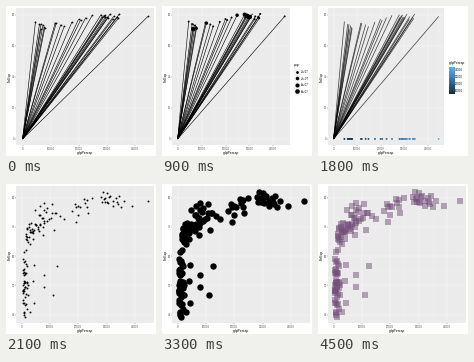
A matplotlib script for the animation above (4.8 s loop, 150 by 150 pixels).

```python
import numpy as np
import matplotlib.pyplot as plt
from matplotlib.animation import FuncAnimation
from matplotlib.colors import LinearSegmentedColormap
from matplotlib.patches import Rectangle

SIZE, DPI = 150, 100
PT = 72 / DPI
TOP, BOTTOM, LEFT = 1.7, 139.2, 10.3
FULL, WIDE, NARROW = 148.3, 128.0, 126.0
BLUE, PURPLE = "#1f6ab3", "#75507b"

plt.rcParams["font.family"] = "Liberation Sans"
ramp = LinearSegmentedColormap.from_list("ramp", ["#132B43", "#56B1F7"])

# European countries: income in thousands, life expectancy
europe = np.array([
    (4.604, 75.7), (32.418, 79.0), (30.486, 78.3), (6.019, 74.1), (7.697, 72.1),
    (11.628, 74.9), (17.596, 75.5), (32.167, 77.2), (28.205, 78.4), (28.926, 79.6),
    (30.036, 78.7), (22.514, 78.3), (14.844, 72.6), (31.163, 80.5), (34.077, 77.8),
    (27.968, 80.2), (6.557, 74.0), (33.725, 78.5), (44.684, 79.05), (12.002, 74.7),
    (19.971, 77.3), (7.885, 71.3), (7.236, 73.2), (13.639, 73.8), (20.660, 76.7),
    (24.836, 79.8), (29.342, 80.0), (34.481, 80.62), (6.508, 70.8), (29.479, 78.5)])

pop = np.full(len(europe), 6.5)
for i, millions in {9: 59.9, 10: 82.4, 13: 0.3, 15: 57.9, 16: 0.7, 17: 16.1,
                    19: 38.6, 21: 22.4, 25: 40.2, 28: 67.3, 29: 59.9}.items():
    pop[i] = millions

others = np.array([
    (30.688, 80.4), (23.190, 79.1), (28.605, 82.0), (30.209, 81.5), (36.023, 78.8),
    (35.110, 76.9), (21.906, 79.7), (23.235, 77.0), (19.234, 77.0), (23.404, 74.8),
    (19.775, 74.2), (19.015, 71.6), (10.207, 73.0), (39.097, 77.3), (33.329, 79.8),
    (18.856, 77.8), (11.461, 69.0), (10.779, 77.9), (10.742, 74.9), (7.723, 78.1),
    (6.341, 77.2), (12.522, 56.8), (11.004, 46.6), (7.703, 49.3), (7.711, 53.4),
    (4.072, 51.5), (4.128, 43.9), (2.773, 41.0), (4.391, 57.0), (1.072, 39.193),
    (0.672, 40.0), (0.241, 45.0), (0.699, 41.0), (9.535, 72.7), (9.022, 72.0)])


def make_world():
    rng = np.random.default_rng(7)
    poor = 10 ** rng.uniform(-0.4, 0.35, 41)
    poor_life = np.clip(rng.normal(50.5, 5.5, 41), 40.5, 64)
    mid = 10 ** rng.uniform(0.12, 0.98, 36)
    mid_life = 70 + 9 * (np.log10(mid) - 0.6) + rng.normal(0, 2.4, 36)
    rest = np.column_stack([np.r_[poor, mid], np.r_[poor_life, mid_life]])
    return np.vstack([europe, others, rest])


world = make_world()

fig = plt.figure(figsize=(SIZE / DPI, SIZE / DPI), dpi=DPI, facecolor="white")
ax = fig.add_axes([0, 0, 1, 1])


def reset():
    ax.clear()
    ax.set_xlim(0, SIZE)
    ax.set_ylim(SIZE, 0)
    ax.axis("off")


def box(x, y, w, h, color, z=0):
    ax.add_patch(Rectangle((x, y), w, h, fc=color, ec="none", zorder=z))


def line(x, y, width, color, z=1, alpha=1):
    ax.plot(x, y, color=color, lw=width * PT, alpha=alpha, zorder=z,
            solid_capstyle="butt")


def label(x, y, text, size=2.75, color="#4d4d4d", ha="center", **kw):
    ax.text(x, y, text, fontsize=size * PT, color=color, ha=ha,
            va="center_baseline" if not kw else "center", **kw)


def dots(x, y, r, color, marker="o", alpha=1):
    side = 2 * np.asarray(r) * PT
    ax.scatter(x, y, s=side ** 2, c=color, marker=marker, alpha=alpha,
               linewidths=0, zorder=5)


def scale(lo, hi, start, end):
    pad = (end - start) / 22
    return lambda v: start + pad + (np.asarray(v) - lo) / (hi - lo) * (end - start - 2 * pad)


def panel(right, xr, yr, yticks):
    """Draw the grey panel with its axes and return both scales."""
    sx = scale(*xr, LEFT, right)
    sy = scale(*yr, BOTTOM, TOP)
    box(LEFT, TOP, right - LEFT, BOTTOM - TOP, "#EBEBEB")
    xticks = np.arange(0, 50, 10)
    half = (yticks[1] - yticks[0]) / 2
    for v in np.arange(0, 50, 5):
        if LEFT < sx(v) < right:
            line([sx(v)] * 2, [TOP, BOTTOM], 0.33 if v % 10 == 0 else 0.17, "white")
    for v in np.arange(yticks[0], yticks[-1] + half, half):
        line([LEFT, right], [sy(v)] * 2, 0.33 if v in yticks else 0.17, "white")
    for v in xticks:
        line([sx(v)] * 2, [BOTTOM, BOTTOM + 0.86], 0.33, "#333333")
        label(sx(v), 142.1, str(v * 1000))
    for v in yticks:
        line([LEFT - 0.86, LEFT], [sy(v)] * 2, 0.33, "#333333")
        label(LEFT - 1.5, sy(v), str(v), ha="right")
    label((LEFT + right) / 2, 146.3, "gdpPercap", 3.44, "black")
    label(3.6, (TOP + BOTTOM) / 2, "lifeExp", 3.44, "black", rotation=90)
    return sx, sy


def radius(values):
    t = (values - values.min()) / np.ptp(values)
    return 0.1 + 0.37 * (1 + 5 * np.sqrt(t))


def key_radius(v, values):
    t = (v - values.min()) / np.ptp(values)
    return 0.1 + 0.37 * (1 + 5 * np.sqrt(t))


def color_bar():
    x, top, h = 130.5, 60.8, 27.0
    label(x, 56.8, "gdpPercap", 3.44, "black", ha="left")
    ax.imshow(np.linspace(1, 0, 60)[:, None], cmap=ramp, aspect="auto", zorder=2,
              extent=(x, x + 5.4, top + h, top), interpolation="bilinear")
    lo, hi = europe[:, 0].min(), europe[:, 0].max()
    for v in (10, 20, 30, 40):
        y = top + (hi - v) / (hi - lo) * h
        for a in (x, x + 4.3):
            line([a, a + 1.1], [y, y], 0.25, "white", 3)
        label(x + 6.5, y, str(v * 1000), color="black", ha="left")


def key_legend(x, title, names, draw):
    label(x, 58.5, title, 3.44, "black", ha="left")
    for i, name in enumerate(names):
        y = 65.6 + 6.6 * i
        box(x, y - 3.1, 5.6, 6.2, "#F2F2F2")
        draw(i, x + 2.8, y)
        label(x + 6.7, y, name, color="black", ha="left")


def rays(step):
    gdp, life = europe.T
    right = FULL if step == 0 else WIDE if step == 3 else NARROW
    sx, sy = panel(right, (0, gdp.max()), (0, life.max()), [0, 20, 40, 60, 80])
    alphas = np.ones(len(gdp))
    if step == 4:
        alphas = 0.4 + 0.6 * (gdp - gdp.min()) / np.ptp(gdp)
    elif step > 4:
        alphas *= 0.7
    for g, e, a in zip(gdp, life, alphas):
        line([sx(0), sx(g)], [sy(0), sy(e)], 0.6 if step < 4 else 0.75, "black", 4, a)

    x, y = sx(gdp), sy(life)
    thousands = ["10000", "20000", "30000", "40000"]
    if step == 0:
        dots(x, y, 0.9, "black")
    elif step == 2:
        dots(x, y, radius(gdp), "black")
        key_legend(130.5, "gdpPercap", thousands,
                   lambda i, a, b: dots(a, b, key_radius(10 * (i + 1), gdp), "black"))
    elif step == 3:
        dots(x, y, radius(pop), "black")
        key_legend(132.2, "pop", ["2e+07", "4e+07", "6e+07", "8e+07"],
                   lambda i, a, b: dots(a, b, key_radius(20 * (i + 1), pop), "black"))
    elif step == 4:
        dots(x, y, 0.9, "black")
        key_legend(130.5, "gdpPercap", thousands,
                   lambda i, a, b: line([a - 2.2, a + 2.2], [b, b], 0.75, "black", 4,
                                        0.5 + 0.15 * i))
    else:
        base = np.full(len(x), sy(0)) if step == 6 else y
        dots(x, base, 0.95, ramp((gdp - gdp.min()) / np.ptp(gdp)))
        color_bar()


# radius, colour, marker, opacity of each scatter look
looks = [
    (0.95, "black", "o", 1),
    (0.95, "#10355a", "o", 1),
    (0.95, BLUE, "o", 1),
    (0.95, "black", "o", 1),
    (3.2, "black", "o", 1),
    (3.2, "#3b283e", "o", 1),
    (3.15, PURPLE, "o", 1),
    (3.15, PURPLE, "o", 0.5),
    (2.8, PURPLE, "s", 0.5),
]


def cloud(look):
    gdp, life = world.T
    sx, sy = panel(FULL, (gdp.min(), gdp.max()), (life.min(), life.max()),
                   [40, 50, 60, 70, 80])
    dots(sx(gdp), sy(life), *look)


def update(i):
    reset()
    if i < 7:
        rays(i)
    else:
        cloud(looks[i - 7])
    ax.set_xlim(0, SIZE)
    ax.set_ylim(SIZE, 0)
    return []


anim = FuncAnimation(fig, update, frames=16, interval=300, init_func=reset,
                     repeat=True, repeat_delay=0, blit=False)
plt.show()
```
